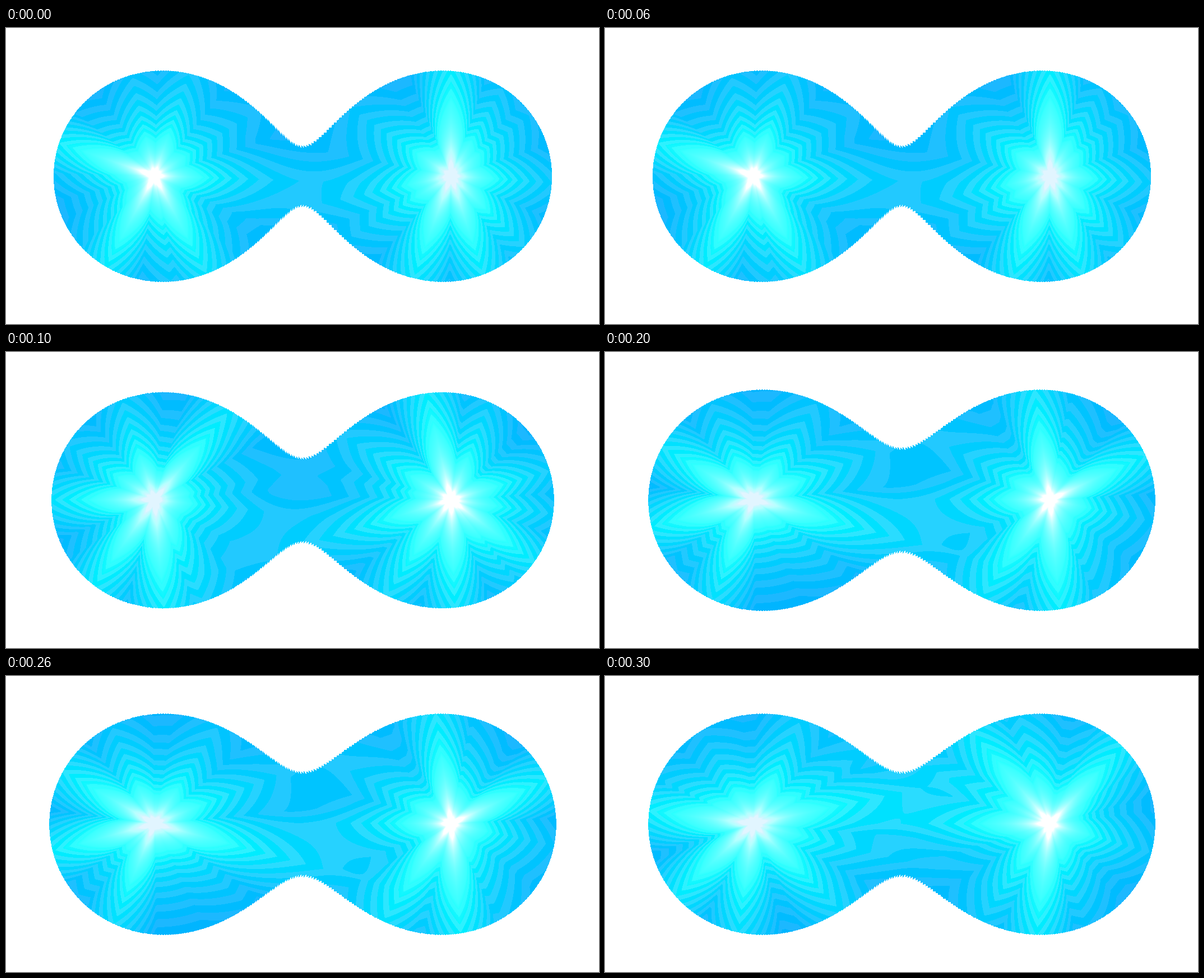
An HTML page with a canvas for the animation above (0.4 s loop, 1058 by 529 pixels).

```html
<!DOCTYPE html>
<html lang="en">
<head>
<meta charset="utf-8">
<title>Twin sparks</title>
<style>
  html, body { margin: 0; width: 100%; height: 100%; overflow: hidden; background: #fff; }
  canvas { display: block; }
</style>
</head>
<body>
<canvas id="stage" width="1058" height="529"></canvas>
<script>
const W = 1058, H = 529, STEP_MS = 100;
const MID_X = 529, MID_Y = 264.5, FOCI = [264.5, 793.5];
const FALLOFF = 1.36, BAND = 0.1;
const BASE_REACH = 56, SPREAD = 23, MINOR_RAYS = 9;

// Main ray directions in degrees, strongest first: left and right spark of each pose.
const poses = [
  [[199, 118, 62], [270, 110, 72]],
  [[85, 125, 310, 180], [257, 88, 37, 124, 163]],
  [[165, 15, 210, 112], [85, 335, 262, 125]],
  [[187, 137, 348, 98, 45], [97, 230, 313, 180]]
];

const lerp = (a, b, t) => a + (b - a) * t;
const clamp01 = t => Math.min(1, Math.max(0, t));

function seededRandom(seed) {
  let state = seed * 7919 + 17;
  return () => (state = state * 16807 % 2147483647) / 2147483647;
}

function makeRays(mainAngles, seed) {
  const random = seededRandom(seed);
  const rays = mainAngles.map((angle, i) => ({ angle, reach: 150 - 8 * i }));
  for (let i = 0; i < MINOR_RAYS; i++) {
    rays.push({ angle: (i + random() * 0.8) * 360 / MINOR_RAYS, reach: lerp(68, 95, random()) });
  }
  return rays;
}

// Ray reach for every half degree around one spark.
function reachTable(rays) {
  return Float32Array.from({ length: 720 }, (_, i) => {
    let reach = BASE_REACH;
    for (const ray of rays) {
      const off = Math.abs((i / 2 - ray.angle + 540) % 360 - 180);
      reach = Math.max(reach, lerp(BASE_REACH, ray.reach, clamp01(1 - off / SPREAD)));
    }
    return reach;
  });
}

function reachAt(table, dx, dy) {
  const turn = (Math.atan2(dy, dx) / Math.PI * 360 + 720) % 720;
  const i = Math.floor(turn);
  return lerp(table[i % 720], table[(i + 1) % 720], turn - i);
}

// Two-centre outline with a saw-toothed waist.
function insideOutline(x, y, level) {
  const tooth = 1 + 4 * Math.exp(-(((x - MID_X) / 90) ** 2));
  const dy = Math.abs(y - MID_Y) + tooth * ((x / 4.5) % 1 - 0.6);
  return FOCI.reduce((sum, fx) => sum + Math.hypot(x - fx, dy) ** -FALLOFF, 0) > level;
}

// Blue to cyan in steps with alternating red, then smoothly to white.
function shade(heat, paleCore) {
  const t = Math.log(heat);
  const band = Math.floor(t / BAND);
  const step = (band + 0.5) * BAND;
  const glow = clamp01((t + 0.2) / 2.5);
  const stripe = band & 1 ? 0 : lerp(28, 46, clamp01(step + 1.3));
  const red = lerp(stripe, 40 + 215 * glow ** 1.3, clamp01((t + 0.2) / 0.4));
  const green = lerp(180, 255, clamp01((step + 1.5) / 1.6) ** 1.2);
  const pale = paleCore ? clamp01((t - 1.6) / 0.6) : 0;
  return [red - 30 * pale, green - 10 * pale];
}

function renderPose(sparks, pose) {
  const layer = document.createElement("canvas");
  layer.width = W;
  layer.height = H;
  const ctx = layer.getContext("2d");
  const image = ctx.createImageData(W, H);
  const level = (0.989 - 0.0245 * Math.min(pose, 2)) / 1000;
  const paleSide = pose === 0 ? 1 : 0;
  const tables = sparks.map((angles, side) => reachTable(makeRays(angles, pose * 2 + side + 1)));
  for (let y = 60; y < 470; y++) {
    for (let x = 70; x < 990; x++) {
      if (!insideOutline(x, y, level)) continue;
      let heat = 0;
      FOCI.forEach((fx, side) => {
        const dx = x - fx, dy = y - MID_Y + 1;
        heat += (reachAt(tables[side], dx, dy) / Math.max(1, Math.hypot(dx, dy))) ** FALLOFF;
      });
      const side = x > MID_X ? 1 : 0;
      image.data.set([...shade(heat, side === paleSide), 255, 255], (y * W + x) * 4);
    }
  }
  ctx.putImageData(image, 0, 0);
  return layer;
}

const stage = document.getElementById("stage").getContext("2d");
const layers = poses.map(renderPose);
let start = null;

function draw(now) {
  if (start === null) start = now;
  const index = Math.floor(Math.max(0, now - start) / STEP_MS) % layers.length;
  stage.fillStyle = "#fff";
  stage.fillRect(0, 0, W, H);
  stage.drawImage(layers[index], 0, 0);
  requestAnimationFrame(draw);
}
requestAnimationFrame(draw);
</script>
</body>
</html>
```
